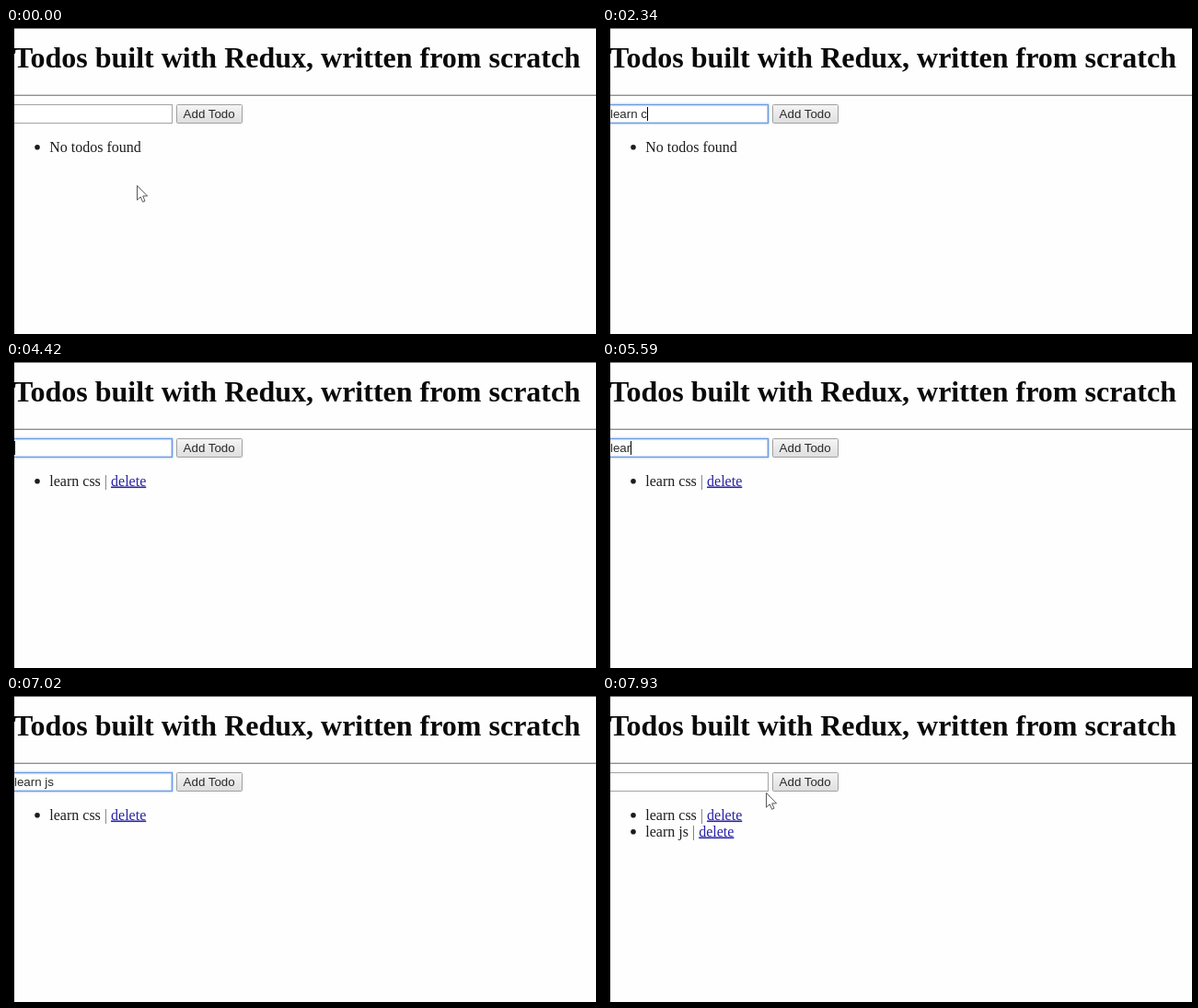
Write an HTML page that moves like this. It is 641 by 333 pixels and loops after 8000 ms.

```html
<!DOCTYPE html>
<html lang="en">
<head>
<meta charset="utf-8">
<title>Todos</title>
<style>
  html, body { margin: 0; width: 100%; height: 100%; overflow: hidden; background: #fdfefd; }
  svg { display: block; width: 641px; height: 333px; }
  text { white-space: pre; }
  .serif { font: 16px "Liberation Serif", "Times New Roman", serif; fill: #1c1c1c; }
  .sans { font: 13.333px "Liberation Sans", Arial, sans-serif; fill: #2a2a2a; }
  .title { font-size: 32px; font-weight: bold; fill: #0a0a0a; }
  .bar { fill: #666; }
  .link { fill: #2a22a6; text-decoration: underline; }
</style>
</head>
<body>
<svg viewBox="0 0 641 333">
  <defs>
    <linearGradient id="up" x2="0" y2="1">
      <stop offset="0" stop-color="#f5f5f5"/><stop offset="1" stop-color="#dedede"/>
    </linearGradient>
    <linearGradient id="down" x2="0" y2="1">
      <stop offset="0" stop-color="#d8d8d8"/><stop offset="1" stop-color="#f0f0f0"/>
    </linearGradient>
  </defs>
  <rect width="641" height="333" fill="#fdfefd"/>
  <rect width="641" height="1" fill="#777"/>
  <text class="serif title" x="8" y="43">Todos built with Redux, written from scratch</text>
  <rect y="72.6" width="641" height="1.4" fill="#8f8f8f"/>

  <rect id="field" x="-10.5" y="83.5" width="191" height="20" fill="#fff" stroke="#a3a3a3"/>
  <g id="ring" fill="none" stroke="#6a9ae0">
    <rect x="-10.5" y="83.5" width="191" height="20" rx="1" stroke-width="3.4" opacity=".3"/>
    <rect x="-10.5" y="83.5" width="191" height="20" rx="1" stroke-width="1.2"/>
  </g>
  <text id="typed" class="sans" x="9" y="98"></text>
  <path id="wave" fill="none" stroke="#555" stroke-width=".9"/>
  <rect id="caret" y="86" width="1" height="15" fill="#000"/>

  <rect id="button" x="185.5" y="83.5" width="71" height="20" rx="1" stroke="#a0a0a0"/>
  <text class="sans" x="192.6" y="98">Add Todo</text>

  <g id="list" class="serif"></g>
  <rect width="9" height="333" fill="#000"/>
  <path id="mouse" d="M.5 .5V16.2L4.2 12.8L6.6 18.3L9 17.2L6.7 11.9H11.6Z" fill="#fff" stroke="#5a5a5e"/>
</svg>
<script>
const LOOP = 8000, BLINK = 520;
const $ = id => document.getElementById(id);
const show = (id, on) => $(id).setAttribute("visibility", on ? "visible" : "hidden");

// Each entry changes part of the state from its time on.
const events = [
  [0, { text: "", focus: false, pressed: false, todos: [], mouse: [142, 171] }],
  [130, { mouse: [141, 152] }],
  [260, { mouse: [136, 122] }],
  [390, { mouse: null }],
  [520, { focus: true }],
  ...typing("learn css", [1300, 1430, 1560, 1820, 1950, 2080, 2340, 2600, 2730]),
  [3770, { mouse: [192, 90] }],
  [3900, { text: "", focus: false, todos: ["learn css"] }],
  [4030, { mouse: [171, 106] }],
  [4420, { mouse: null, focus: true }],
  ...typing("learn js", [5070, 5200, 5330, 5590, 5720, 5850, 6370, 6500]),
  [7540, { mouse: [192, 90] }],
  [7670, { focus: false, pressed: true }],
  [7800, { text: "", pressed: false, todos: ["learn css", "learn js"] }],
  [7930, { mouse: [178, 105] }]
];

function typing(word, times) {
  return times.map((t, i) => [t, { text: word.slice(0, i + 1) }]);
}

function stateAt(t) {
  const state = { edited: 0 };
  for (const [start, change] of events) {
    if (start > t) break;
    Object.assign(state, change);
    if ("text" in change || "focus" in change) state.edited = start;
  }
  return state;
}

function todoItem(label, i) {
  const y = 134.5 + i * 18;
  const link = label ? '<tspan class="bar"> | </tspan><tspan class="link">delete</tspan>' : "";
  return `<circle cx="34" cy="${y - 4.7}" r="2.8"/>` +
    `<text x="47.3" y="${y}">${label || "No todos found"}${link}</text>`;
}

function squiggle(from, to) {
  let d = `M${from} 100.5`;
  for (let x = from + 1; x <= to; x++) d += `L${x} ${100 + Math.sin((x - from) * Math.PI / 2)}`;
  return d;
}

let listKey;
function draw(t) {
  const s = stateAt(t);
  const typed = $("typed");
  typed.textContent = s.text;
  const end = 9 + (s.text ? typed.getComputedTextLength() : 0);
  $("caret").setAttribute("x", Math.round(end));
  show("caret", s.focus && (t - s.edited) % (2 * BLINK) < BLINK);
  show("ring", s.focus);

  const misspelt = s.text === "learn css";
  show("wave", misspelt);
  if (misspelt) $("wave").setAttribute("d", squiggle(42, 62));

  $("button").setAttribute("fill", s.pressed ? "url(#down)" : "url(#up)");
  const key = s.todos.join();
  if (key !== listKey) {
    listKey = key;
    $("list").innerHTML = (s.todos.length ? s.todos : [""]).map(todoItem).join("");
  }

  show("mouse", s.mouse);
  if (s.mouse) $("mouse").setAttribute("transform", `translate(${s.mouse})`);
}

let begin;
function tick(now) {
  begin ??= now;
  draw((now - begin) % LOOP);
  requestAnimationFrame(tick);
}
draw(0);
requestAnimationFrame(tick);
</script>
</body>
</html>
```
